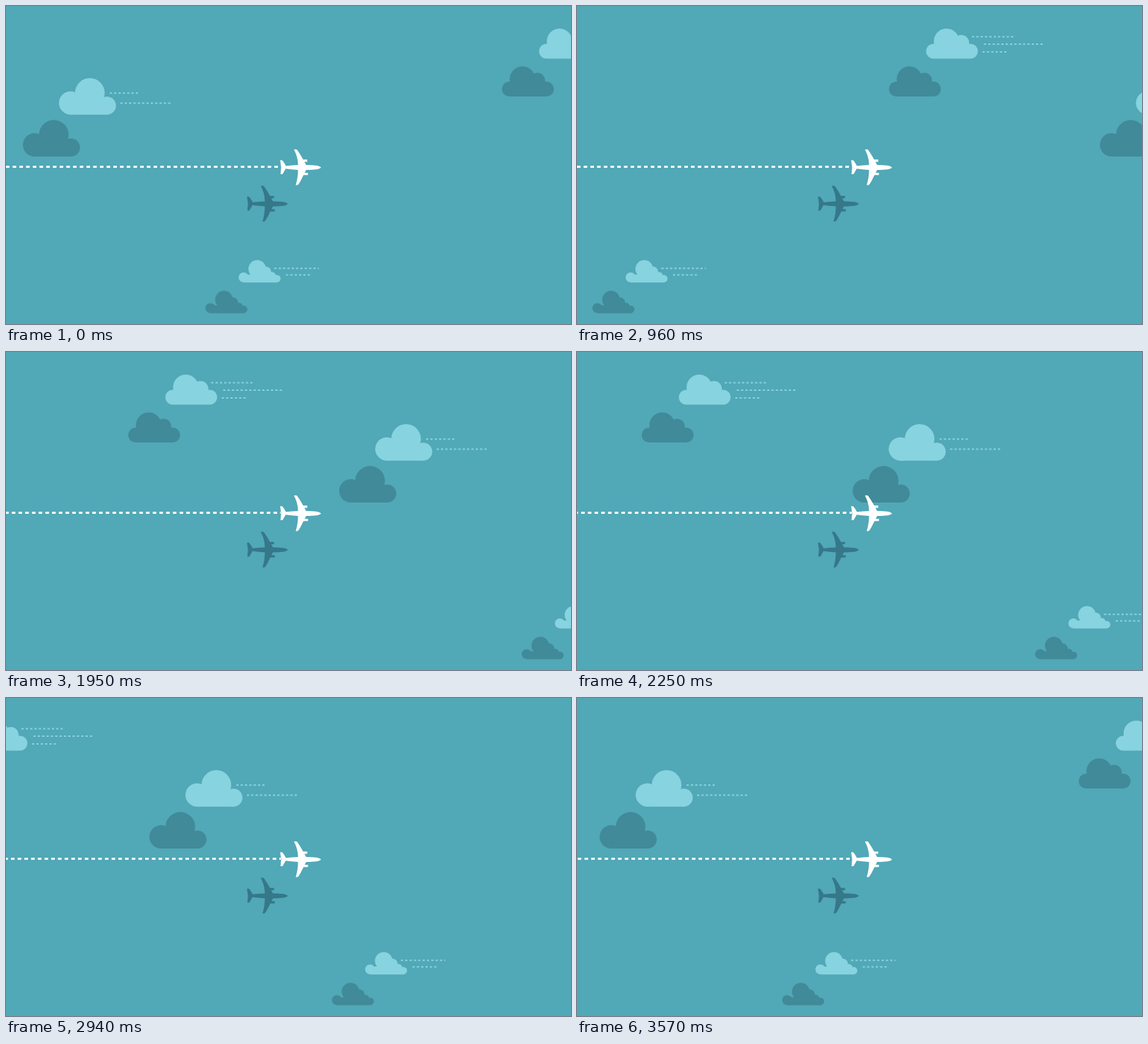
These frames come from a looping animation (800x450 px, 3600 ms). An HTML page:

```html
<!DOCTYPE html>
<html lang="en">
<head>
<meta charset="utf-8">
<title>Plane above the clouds</title>
<style>
  html, body { margin: 0; width: 100%; height: 100%; overflow: hidden; background: #51a8b7; }
  svg { display: block; width: 800px; height: 450px; }
  .light { fill: #87d3df; }
  .shade { fill: #418a99; }
  .streaks { fill: none; stroke: #87d3df; stroke-width: 2; stroke-dasharray: 3.2 2.95; }
  #trail { stroke: #fff; stroke-width: 2.8; stroke-dasharray: 5 4.5; }
</style>
</head>
<body>
<svg viewBox="0 0 800 450">
  <defs>
    <!-- Each cloud starts at its own left edge, x = 0 -->
    <g id="wide">
      <circle cx="29" cy="50" r="18"/>
      <circle cx="50" cy="52" r="11"/>
      <rect y="53.5" width="73.5" height="21" rx="10.5"/>
    </g>
    <g id="big">
      <circle cx="43.8" cy="123" r="21"/>
      <circle cx="16.5" cy="137.2" r="16.5"/>
      <circle cx="68" cy="141" r="12.8"/>
      <path d="M16.5 130H60L68 141V153.7H16.5Z"/>
    </g>
    <g id="small">
      <circle cx="26.3" cy="372" r="12.5"/>
      <circle cx="38.5" cy="376.5" r="7.7"/>
      <circle cx="47.5" cy="381.5" r="5"/>
      <circle cx="7" cy="384" r="7.1"/>
      <circle cx="54" cy="385.8" r="5.4"/>
      <path d="M7 380H48L54 385.8V391.2H7Z"/>
    </g>
    <path id="plane" d="M446 228.5C445 231 437 232 425 232C421 239 418 247 414 252.5Q412.5 254 410.3 253.2C412.5 246 413.5 239 413.5 232Q404 231.5 396 230.3C394.500 233 393 236 391.500 238H388.700L389.600 228.500L388.200 218.300H391C393 220.500 395 223.500 396.300 226.300Q405 225.300 413.500 225C413.500 217 411 209 407.700 203.300Q409.500 202 412 203.300C417 210 421 218 425 225C437 225 445 226 446 228.500ZM420 217.300H426.500V220.500H420ZM421 236H427.500V239.300H420Z"/>
  </defs>

  <g id="sky"></g>
  <path id="trail" d="M-20 227.5H389"/>
  <use href="#plane" x="-47" y="51.5" fill="#357889"/>
  <use href="#plane" fill="#fff"/>
</svg>
<script>
const LOOP = 3600;
const SPAN = 977;        // distance a cloud covers in one loop
const DASH = 9.5;        // pitch of the trail
const DASH_TIME = 240;   // time for the trail to move by one dash

const clouds = [
  { id: "wide", start: 755, dx: -52.5, dy: 53.5, streaks: "M65 43.5h58.5M82 54h84M80 65h34" },
  { id: "big", start: 75.2, dx: -51, dy: 59.3, streaks: "M72 123.300h40M87 137.500h71" },
  { id: "small", start: 329.7, dx: -47, dy: 43.5, streaks: "M50.5 371.300h63M67 380.600h37" }
];

const sky = document.getElementById("sky");
const trail = document.getElementById("trail");

// Two copies one span apart keep each cloud seamless at the edges.
sky.innerHTML = clouds.map(({ id, dx, dy, streaks }) => {
  const copy = x => `<g transform="translate(${x})">
    <use href="#${id}" class="shade" x="${dx}" y="${dy}"/>
    <use href="#${id}" class="light"/>
    <path class="streaks" d="${streaks}"/></g>`;
  return `<g>${copy(0)}${copy(-SPAN)}</g>`;
}).join("");

function draw(now) {
  const t = now % LOOP;
  clouds.forEach(({ start }, i) => {
    const x = (start + SPAN * (1 - t / LOOP)) % SPAN;
    sky.children[i].setAttribute("transform", `translate(${x})`);
  });
  const shift = t / DASH_TIME % 1 * DASH;
  trail.setAttribute("stroke-dashoffset", shift - 20 % DASH);
  requestAnimationFrame(draw);
}
draw(performance.now());
</script>
</body>
</html>
```
